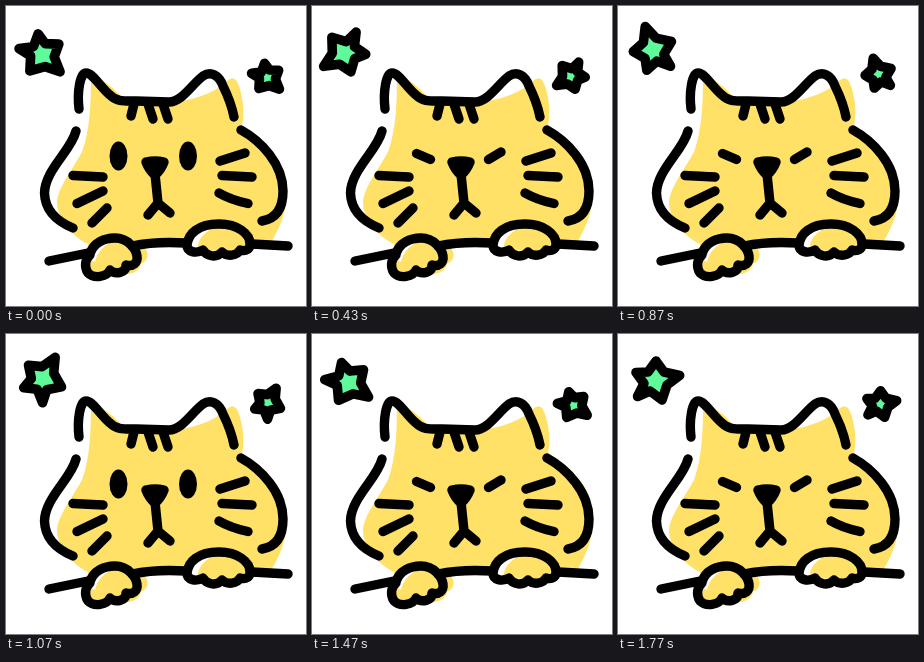
Recreate the animation shown at these times as an HTML page. Size 300 by 300 pixels, loop 1810 ms.

```html
<!DOCTYPE html>
<html lang="en">
<head>
<meta charset="utf-8">
<title>Peeking cat</title>
<style>
  html, body { margin: 0; width: 100%; height: 100%; overflow: hidden; background: #fff; }
  svg { display: block; width: 100%; height: 100%; }
  .ink { fill: none; stroke: #000; stroke-width: 9.4; stroke-linecap: round; stroke-linejoin: round; }
  .fur { fill: #ffe168; }
  .star { fill: #5ffb9b; stroke: #000; stroke-linejoin: round; }
</style>
</head>
<body>
<svg viewBox="0 0 300 300">
  <path class="fur" d="M85 69 C98 74 112 84 118 96 L172 96 C194 92 211 85 221 75 Q226 70 230 74 C234 80 236 90 237 98
    Q238 110 236 120 C258 134 280 156 281 184 C281 205 274 222 264 238 L246 238 L230 246 L200 244 L182 237 L134 238
    C144 244 144 254 135 258 C133 266 124 270 112 268 L84 266 L82 238 C66 230 51 214 51 196 C52 182 66 164 76 146 C84 124 85 98 85 69 Z"/>
  <path fill="#fff" d="M82 252 C85 238 96 233 109 234 C98 239 91 246 89 256 Z
    M183 240 C185 224 198 219 212 220 C199 225 191 233 192 243 Z"/>
  <g class="ink">
    <path d="M73 103 C71 86 74 67 80 67 C87 67 95 82 104 89 C111 96 118 95 130 95 L163 96
      C176 96 187 77 197 70 C205 65 213 69 217 80 Q225 96 228 111"/>
    <path d="M128 98 L125 110 M142 98 L147 113 M157 98 L162 113"/>
    <path d="M70 125 C65 145 39 164 38.5 187 C39 207 55 217 67 222"/>
    <path d="M235 124 C255 135 277 158 277 185 C277 205 268 213 256 215"/>
    <path d="M67 169.5 L97 171 M71 197.5 L97 185 M86 217 L101 202"/>
    <path d="M214 155 L239 147 M216 169.5 L246 171 M213 187 Q225 194 242 197.5"/>
    <path fill="#000" d="M140 156 Q149 154 158 156 Q155 164 149 169 Q143 164 140 156 Z"/>
    <path d="M149 168 L152 197 M142 209 L152 197 L164 207"/>
    <path d="M43 255 L82 247 M126 240 Q150 235 180 237 M246 238 L282 240"/>
    <path d="M84 248 C87 237 98 232 109 232 C122 232 130 243 131 250 C132 257 127 261 120 259
      C121 267 109 269 104 264 C101 271 88 273 82 267 C78 261 79 253 84 249 Z"/>
    <path d="M181 239 C182 228 192 218 213 218 C232 218 244 228 244 238 C244 243 240 246 234 244
      C231 250 221 251 216 246 C211 252 201 251 197 244 C190 248 181 246 181 239 Z"/>
  </g>
  <g id="open">
    <ellipse cx="112.5" cy="150" rx="9" ry="14.5"/>
    <ellipse cx="182" cy="150" rx="9" ry="14.5"/>
  </g>
  <path id="shut" class="ink" d="M104.5 147.5 L118.5 153.5 M176.5 153.5 L189 146"/>
  <g id="stars"></g>
</svg>
<script>
const LOOP = 1810, LAST = 53, REST = 38;
const BLINKS = [13, 27, 41];
const byId = id => document.getElementById(id);

// Alternating tips and notches, measured from an off-centre pivot.
const OUTLINE = [
  [26.7, -5], [14, 4.5], [9, 19.5], [-3, 10.5], [-15.5, 16],
  [-9, 3], [-17, -8], [-5, -8.5], [3, -19.5], [11, -8.5]
];

function addStar(x, y, scale) {
  const star = document.createElementNS('http://www.w3.org/2000/svg', 'path');
  star.setAttribute('class', 'star');
  star.setAttribute('stroke-width', 9.6);
  star.setAttribute('d', 'M' + OUTLINE.map(p => p.map(v => v * scale).join()).join('L') + 'Z');
  byId('stars').append(star);
  return deg => star.setAttribute('transform', `translate(${x} ${y}) rotate(${deg})`);
}

const spins = [addStar(35, 46.5, 1), addStar(260.5, 70, 0.68)];

// Steps run at 30 per second, starting on multiples of 10 ms.
function stepAt(ms) {
  const n = Math.round(ms * 0.03);
  const start = Math.round(n * 10 / 3) * 10;
  return Math.min(LAST, start > ms ? n - 1 : n);
}

function draw(now) {
  const step = stepAt(now % LOOP);
  // The spin snaps back to its resting pose on the last step.
  const turn = 8 * ((step === LAST ? REST : step) - REST);
  spins.forEach(spin => spin(turn));
  const shut = BLINKS.filter(b => step >= b).length % 2 === 1;
  byId('open').style.display = shut ? 'none' : '';
  byId('shut').style.display = shut ? '' : 'none';
}

const begin = performance.now();
function tick() {
  draw(performance.now() - begin);
  requestAnimationFrame(tick);
}
tick();
</script>
</body>
</html>
```
